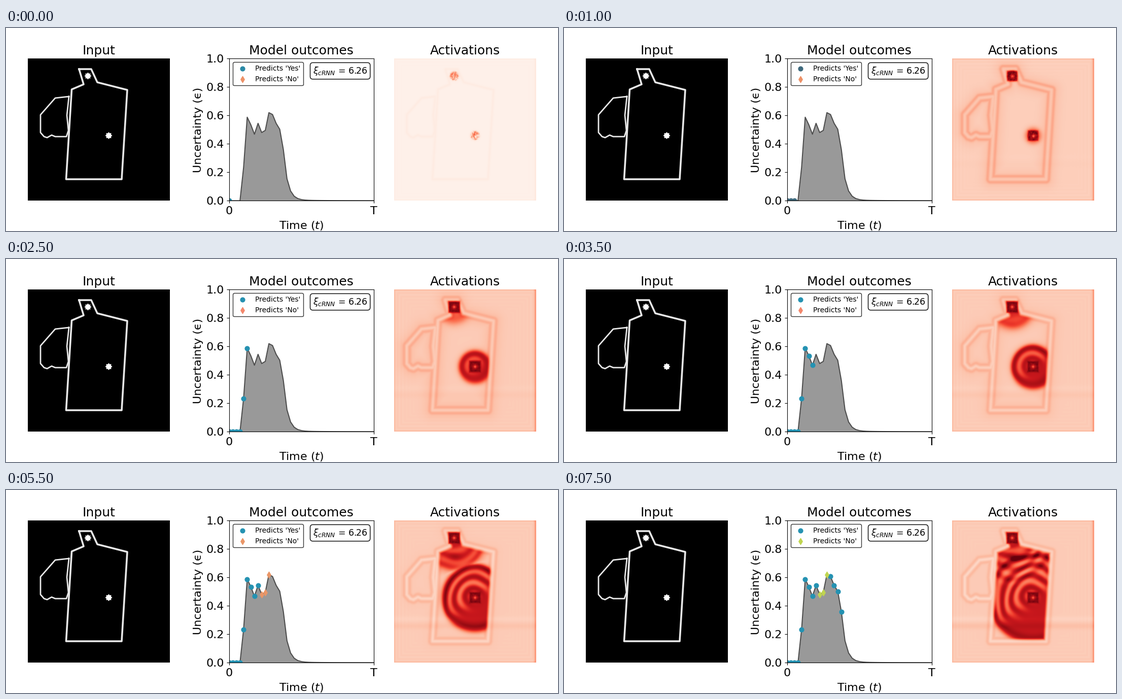
A matplotlib script that plays this animation: 1088x400 px, repeating every 8 s.

```python
import numpy as np
import matplotlib.pyplot as plt
from matplotlib.animation import FuncAnimation
from matplotlib.path import Path

W, H, DPI = 1088, 400, 100
FRAMES, INTERVAL = 16, 500
SIDE = 280
plt.rcParams["font.family"] = "DejaVu Sans"

# Outlines in panel pixels
BODY = [(101, 21), (125, 21), (137, 47), (196, 62), (185, 238),
        (75.5, 238), (86.5, 61), (110, 51), (101, 21)]
HANDLE = [(81, 75), (54, 78), (25, 111), (25, 146), (32, 154), (38, 156),
          (47, 151), (54, 154), (76, 154), (80, 142), (77, 112), (81, 75)]
DOT_A, DOT_B = (118.5, 34.5), (159.5, 152)

TEAL, SLATE = np.array([36, 146, 178]), np.array([62, 105, 125])
CORAL, LIME = np.array([244, 136, 108]), np.array([192, 213, 80])

# Flat start, jagged plateau, geometric decay
steps = np.arange(41)
PLATEAU = [.235, .588, .535, .468, .545, .48, .495, .62, .607, .545, .503, .36]
decay = np.arange(25)
uncertainty = np.r_[np.zeros(4), PLATEAU,
                    .15 * .43 ** decay + .005 * np.exp(-decay / 8)]
says_no = (steps >= 9) & (steps <= 11)

axis = np.arange(1, SIDE, 2.0)
X, Y = np.meshgrid(axis, axis)


def soft(v, width=1.5):
    return 1 / (1 + np.exp(-np.clip(v / width, -40, 40)))


def bell(v, width):
    return np.exp(-(v / width) ** 2)


def grow(i, tau):
    return 1 - bell(i, tau)


def mix(a, b, k):
    return (a + (b - a) * np.clip(k, 0, 1)) / 255


def path_distance(points):
    best = np.full(X.shape, np.inf)
    for (x0, y0), (x1, y1) in zip(points, points[1:]):
        dx, dy = x1 - x0, y1 - y0
        k = np.clip(((X - x0) * dx + (Y - y0) * dy) / (dx * dx + dy * dy), 0, 1)
        best = np.minimum(best, np.hypot(X - x0 - k * dx, Y - y0 - k * dy))
    return best


body_gap = path_distance(BODY)
outline_gap = np.minimum(body_gap, path_distance(HANDLE))
inside = Path(BODY).contains_points(np.c_[X.ravel(), Y.ravel()]).reshape(X.shape)
mask = soft(np.where(inside, body_gap, -body_gap) - 4)
r_a, r_b = (np.hypot(X - x, Y - y) for x, y in (DOT_A, DOT_B))
upward = soft(-.75 * (X - DOT_B[0]) - (Y - DOT_B[1]) + 4, 8)
edge = np.minimum(np.minimum(X, SIDE - X), np.minimum(Y, SIDE - Y))
grain = np.random.default_rng(4).uniform(-1, 1, X.shape)


def rings(lag):
    """Ripples trailing a wave front: dark crest first, then a light gap."""
    return np.cos(2 * np.pi * (lag - 7) / 21)


def background(i):
    base = .03 + .165 * grow(i, 1.2)
    v = base + (.03 * np.exp(-i) - .05 * grow(i, 2)) * bell(outline_gap, 2.5)
    v += (.06 * grow(i, 1) + .1 * i * np.exp(-i)) * bell(outline_gap - 6, 3)
    v += .05 * i * np.exp(-i / 3) * bell(outline_gap, 18)
    border = .03 + .08 * grow(i, .8)
    v += border * (soft(X - SIDE + 4, .5) + .5 * soft(2.5 - edge, .5))
    v += .2 * border * np.cos(edge * .9) * np.exp(-edge / 14)
    v += .04 * i / FRAMES * (bell(Y - 208, 6) - .6 * bell(Y - 194, 5))
    return base, v


def waves(i, base):
    lag_a, lag_b = 5 + 5.5 * i - r_a, 5 + 5.7 * i - r_b
    wave_a, wave_b = soft(lag_a, 4), soft(lag_b, 2.5)
    rise = np.maximum(wave_a * (.05 + .6 * grow(i, 4) - base),
                      wave_b * (.05 + .6 * grow(i, 2) - base))
    strength = .2 * grow(i, 5)
    warp = 3 * grow(i, 12) * np.sin(X / 11 + Y / 17)
    rise += strength * wave_b * (rings(lag_b + warp) * upward + .6 * (1 - upward))
    rise += .7 * strength * grow(i, 11) * wave_a * rings(lag_a - warp)
    # Crest along the leading edge, and the spot where both waves meet
    rise += strength * wave_b * bell(lag_b - 10, 8) * .6
    rise += .2 * soft(i - 10) * bell(np.hypot((X - 120) / 14, (Y - 72) / 9), 1)
    return mask * rise


def activation(i):
    base, v = background(i)
    v += waves(i, base)
    late = grow(i, 1.7)
    off = 3 * (1 - late)
    for (x, y), r in ((DOT_A, r_a), (DOT_B, r_b)):
        square = np.maximum(abs(X - x), abs(Y - y))
        shape = soft(8.5 + 2.5 * late - late * square - (1 - late) * r, .8)
        hole = bell(np.hypot(X - x - off, Y - y - off), 3.5)
        patch = (.36 + .62 * grow(i, .9)) * (1 - .5 * hole)
        patch += (.2 * (1 - late) + .03) * grain - .05 * late * bell(square - 6, 1.5)
        v += shape * (patch - v)
    return np.clip(v, 0, 1)


def yes_color(i):
    return mix(TEAL, SLATE, 1.3 * bell(i - 2, 1.5))


def no_color(i):
    return mix(CORAL, LIME, bell(i - 1, .7) + (max(0, i - 8) / 7) ** 2)


fig = plt.figure(figsize=(W / DPI, H / DPI), dpi=DPI, facecolor="white")


def panel(x, width, title, bottom=60):
    ax = fig.add_axes([x / W, bottom / H, width / W, SIDE / H])
    ax.set_title(title, fontsize=18)
    return ax


def picture(x, title):
    ax = panel(x, SIDE, title)
    ax.set(xlim=(0, SIDE), ylim=(SIDE, 0), xticks=[], yticks=[])
    ax.spines[:].set_visible(False)
    return ax


# Input drawing
ax_in = picture(43, "Input")
ax_in.set_facecolor("black")
for points, lw in ((BODY, 2.6), (HANDLE, 2)):
    ax_in.plot(*zip(*points), color="#e8e8e8", lw=lw, solid_joinstyle="round")
spin = np.arange(16) * np.pi / 8
radius = 6 + np.cos(8 * spin)
for x, y in (DOT_A, DOT_B):
    ax_in.fill(x + radius * np.cos(spin), y + radius * np.sin(spin), "white", lw=0)

# Uncertainty curve
ax = panel(439.8, 285, "Model outcomes", bottom=59.6)
ax.fill_between(steps, uncertainty, color="#999999", lw=0)
ax.plot(steps, uncertainty, color="#4d4d4d", lw=1.5)
ax.set(xlim=(0, 40), ylim=(0, 1))
ax.set_xticks([0, 40], ["0", "T"])
ax.tick_params(labelsize=16)
ax.tick_params(axis="x", pad=4)
ax.set_xlabel("Time ($t$)", fontsize=16, labelpad=5)
ax.set_ylabel("Uncertainty (\u03f5)", fontsize=16)
yes = ax.scatter([], [], s=40, marker="o", zorder=2.2, label="Predicts 'Yes'")
no = ax.scatter([], [], s=40, marker="d", zorder=2.2, label="Predicts 'No'")
legend = ax.legend(loc="upper left", fontsize=10, edgecolor="black")
ax.text(.957, .953, r"$\xi_{cRNN}$ = 6.26", transform=ax.transAxes, fontsize=12.5,
        ha="right", va="top", bbox=dict(boxstyle="round,pad=0.3", fc="white"))

# Activation map
ax_act = picture(765, "Activations")
image = ax_act.imshow(activation(0), cmap="Reds", vmin=0, vmax=1,
                      extent=(0, SIDE, SIDE, 0), interpolation="bilinear",
                      aspect="auto")
curve = np.c_[steps, uncertainty]


def update(i):
    image.set_data(activation(i))
    shown = steps <= i
    groups = ((yes, ~says_no, yes_color(i)), (no, says_no, no_color(i)))
    for (dots, pick, color), key in zip(groups, legend.legend_handles):
        dots.set_offsets(curve[shown & pick])
        dots.set_color([color])
        key.set_color([color])
    return image, yes, no


anim = FuncAnimation(fig, update, frames=FRAMES, interval=INTERVAL,
                     repeat=True, repeat_delay=0, blit=False)
plt.show()
```
